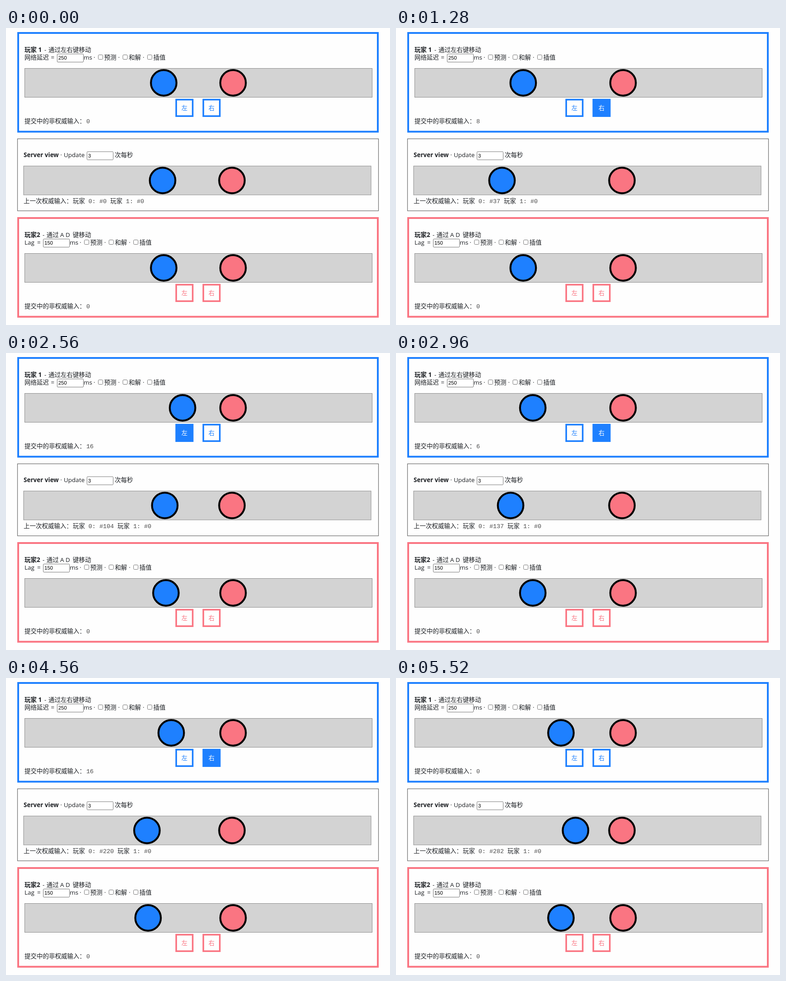
Write an HTML page that moves like this. It is 851 px wide and 658 px high and loops after 5.6 s.

```html
<!DOCTYPE html>
<html lang="zh-CN">
<head>
<meta charset="utf-8">
<style>
html, body { margin: 0; width: 100%; height: 100%; overflow: hidden; background: #fefefe; }
svg { display: block; width: 851px; height: 658px; }
text { font: 13.5px "Open Sans", "Noto Sans CJK SC", "Noto Sans CJK", sans-serif; fill: #1c1f23; }
.b { font-weight: 700; }
.in { font: 11.2px "Liberation Sans", Arial, sans-serif; fill: #000; }
.mono { font: 13.4px "Liberation Mono", "Noto Sans CJK SC", "Noto Sans CJK", monospace; }
.mono tspan { fill: #4c4c4c; }
.btn text { font-size: 13.4px; text-anchor: middle; }
</style>
</head>
<body>
<svg id="stage" viewBox="0 0 851 658"></svg>
<script>
const BLUE = '#1e80ff', PINK = '#fa7582';
const LOOP = 5600, STEP = 80;
const INPUTS = 283;                                // inputs sent in one loop
const TURNS = [0, 37.5, 90.9, 137.75, 189.6, 238.5]; // left, right, left, ...
const CLOCK = [[348, 0], [1280, 54.3], [2080, 100.3], [2960, 152.3],
               [3680, 195.6], [4560, 245.6], [5520, 303]]; // ms -> input ticks
const UPDATE = 16.65, PHASE = 50.6 - 4 * UPDATE;   // server updates, in ticks
const LAG1 = 12.5, LAG2 = 7.5, UPLINK = 12;

const text = (x, y, s, cls = '') => `<text x="${x}" y="${y}" class="${cls}">${s}</text>`;

const field = (x, y, s) =>
  `<rect x="${x + .5}" y="${y + .5}" width="58" height="18" rx="1.5" fill="#fff" stroke="#767676"/>` +
  text(x + 3, y + 13.2, s, 'in');

const check = (x, y) =>
  `<rect x="${x}" y="${y}" width="10" height="10" rx="2" fill="#fff" stroke="#767676"/>`;

const ball = (x, y, color, id = '') =>
  `<circle id="${id}" cx="${x}" cy="${y}" r="28.3" fill="${color}" stroke="#000" stroke-width="4.2"/>`;

const track = (x, y, id) =>
  `<rect x="${x}" y="${y}" width="770" height="64" fill="#d3d3d3" stroke="#8c8c8c"/>` +
  ball(x + 308, y + 32, BLUE, id) + ball(x + 461.7, y + 32, PINK);

const button = (x, label, color, id) =>
  `<g class="btn" id="${id}"><rect x="${x}" y="158.7" width="36.5" height="36.5" fill="#fefefe" ` +
  `stroke="${color}" stroke-width="3.6"/><text x="${x + 18.2}" y="182.3" style="fill:${color}">${label}</text></g>`;

function options(dx, lag) {
  const names = ['预测', '和解', '插值'];
  return `<g transform="translate(${dx})">` + field(113, 57, lag) + text(172, 70.3, 'ms') +
    names.map((s, i) => text(194 + i * 54.5, 70.3, '·') + check(204.5 + i * 54.5, 59.5) +
      text(217.5 + i * 54.5, 70.3, s)).join('') + '</g>';
}

const player = (n, color, dy, head, dx, lag) =>
  `<g transform="translate(0 ${dy})">` +
  `<rect x="27" y="11" width="797" height="218.7" fill="none" stroke="${color}" stroke-width="4"/>` +
  head + options(dx, lag) + track(41.5, 89.5, 'ball' + n) +
  button(377.2, '左', color, 'left' + n) + button(437.3, '右', color, 'right' + n) +
  text(41, 211.3, '提交中的非权威输入：') +
  `<text x="178" y="211.3" class="mono"><tspan id="pending${n}">0</tspan></text></g>`;

const head1 = text(41, 52.7, '玩家 1', 'b') + text(85, 52.7, '-') + text(94, 52.7, '通过左右键移动') +
  text(41, 70.3, '网络延迟') + text(99.5, 70.3, '=');
const head2 = text(41, 52.7, '玩家2', 'b') + text(81, 52.7, '-') + text(89.7, 52.7, '通过') +
  text(120, 52.7, 'A D') + text(148, 52.7, '键移动') + text(41, 70.3, 'Lag') + text(69, 70.3, '=');

stage.innerHTML =
  player(1, BLUE, 0, head1, 0, 250) +
  '<rect x="25.5" y="245.5" width="800" height="159.5" fill="none" stroke="#686868" stroke-width="1.2"/>' +
  text(39, 286.3, 'Server view', 'b') + text(120.5, 286.3, '·') + text(128, 286.3, 'Update') +
  field(179, 273.5, 3) + text(241, 286.3, '次每秒') + track(39, 305.8, 'ball0') +
  text(39, 387.5, '上一次权威输入：') +
  '<text x="148" y="387.5" class="mono">玩家<tspan id="ack"></tspan>玩家<tspan> 1: #0</tspan></text>' +
  player(2, PINK, 410, head2, -30.8, 150);

const $ = id => document.getElementById(id);

function ticksAt(ms) {
  if (ms <= CLOCK[0][0]) return 0;
  let i = 1;
  while (i < CLOCK.length - 1 && ms > CLOCK[i][0]) i++;
  const [t0, n0] = CLOCK[i - 1], [t1, n1] = CLOCK[i];
  return n0 + (ms - t0) * (n1 - n0) / (t1 - t0);
}

// Time of the latest server update known after a delay
const lastUpdate = n => PHASE + Math.floor((n - PHASE) / UPDATE) * UPDATE;

const processed = update => Math.max(0, Math.min(INPUTS, update - UPLINK));

// Net displacement in pixels after a number of inputs
function offset(count) {
  let sum = 0;
  TURNS.forEach((from, i) => {
    const to = Math.min(count, TURNS[i + 1] ?? INPUTS);
    if (to > from) sum += (to - from) * (i % 2 ? 1 : -1);
  });
  return sum * 3.08;
}

function press(id, on) {
  const [box, label] = $(id).children;
  box.setAttribute('fill', on ? BLUE : '#fefefe');
  label.style.fill = on ? '#fff' : BLUE;
}

function draw(ms) {
  const n = ticksAt(Math.floor(ms / STEP) * STEP);
  const seen = [0, LAG1, LAG2].map(lag => lastUpdate(n - lag));
  seen.forEach((u, i) =>
    $('ball' + i).setAttribute('cx', (i ? 349.5 : 347) + offset(processed(u))));

  const sent = Math.min(n, INPUTS);
  $('pending1').textContent = Math.max(0, Math.round(sent - Math.max(0, seen[1] + LAG1)));
  $('ack').textContent = ` 0: #${Math.max(0, Math.floor(processed(seen[0])) - 1)} `;

  const active = n > 0 && n < INPUTS;
  const right = TURNS.filter(t => t <= n).length % 2 === 0;
  press('left1', active && !right);
  press('right1', active && right);
}

const start = performance.now();
function tick() {
  draw((performance.now() - start) % LOOP);
  requestAnimationFrame(tick);
}
tick();
</script>
</body>
</html>
```
